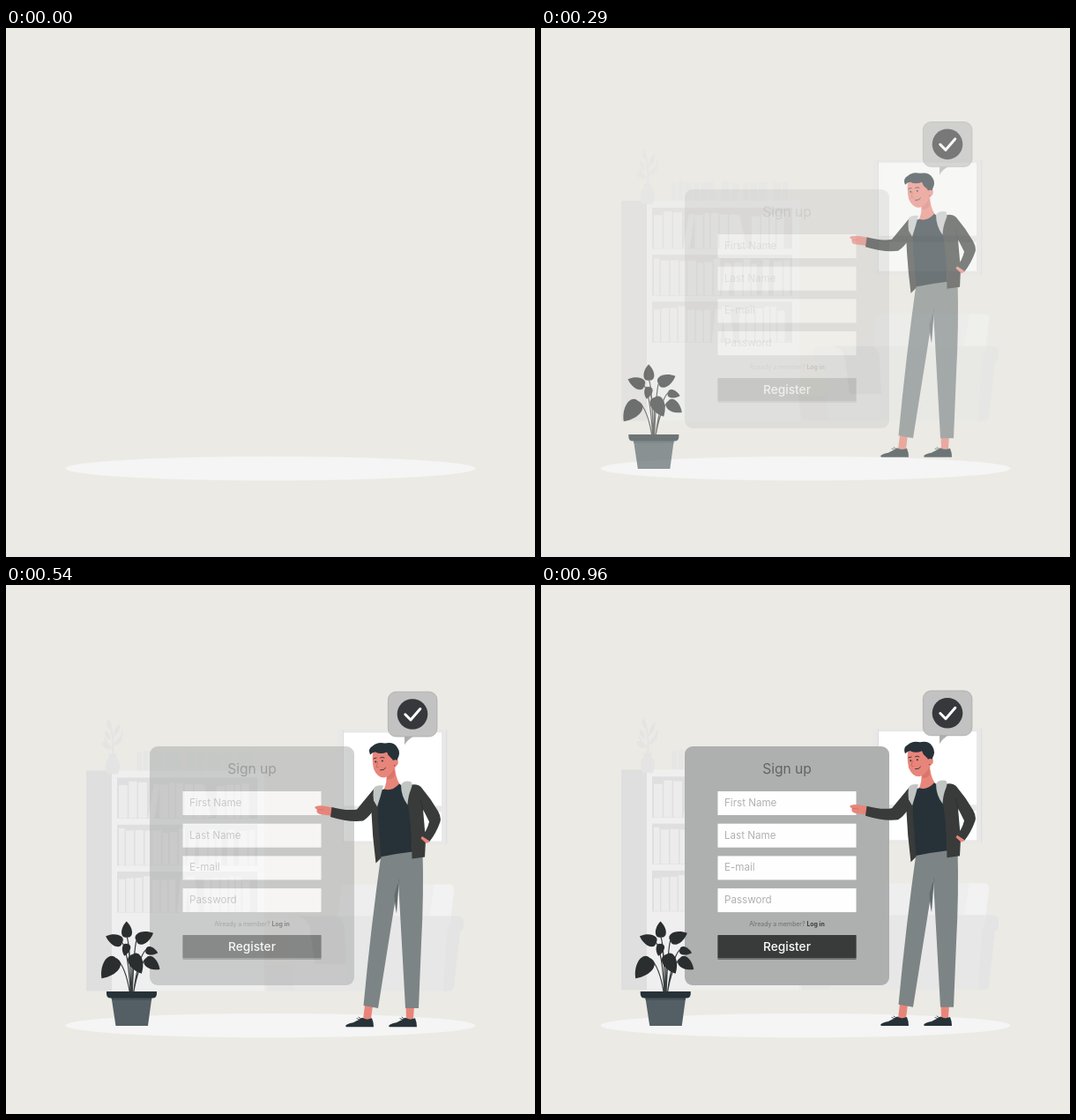
Write an HTML page that moves like this. It is 600x600 px and loops after 1 s.

```html
<!DOCTYPE html>
<html lang="en">
<head>
<meta charset="utf-8">
<title>Sign up</title>
<style>
html, body { margin: 0; width: 100%; height: 100%; overflow: hidden; background: #ebeae4; }
svg { display: block; width: 100vw; height: 100vh; }
text { font-family: Inter, Roboto, sans-serif; }
.skin { fill: #e8857a; }
.navy { fill: #263238; }
.coat { fill: #383b3a; }
.hood { fill: #c1c5c4; }
.line { fill: none; stroke-linecap: round; stroke-linejoin: round; }
</style>
</head>
<body>
<svg viewBox="0 0 600 600" xmlns="http://www.w3.org/2000/svg">
  <ellipse cx="300" cy="499.6" rx="232.5" ry="13.7" fill="#f5f5f5"/>

  <g id="room">
    <!-- bookcase -->
    <rect x="91" y="209" width="29" height="250" fill="#dfdfdf"/>
    <rect x="120" y="209" width="173" height="250" fill="#efefef"/>
    <g id="shelves"></g>
    <g fill="#e4e4e4">
      <path d="M116 190H126L125 194Q130 200 129 206L127 213H115L113 206Q112 200 117 194Z"/>
      <path class="line" d="M121 191Q123 172 118 156M121 184Q114 180 112 173M122 180Q131 175 132 165M122 170Q127 164 129 157" stroke="#e4e4e4" stroke-width="2"/>
      <g id="twigs"></g>
    </g>
    <!-- window -->
    <rect x="376.500" y="162" width="124" height="131" fill="#e8e8e8"/>
    <path d="M383 166H494V249H383ZM383 256H494V289H383Z" fill="#fff"/>
    <path d="M382.500 163V292M499.700 163V292" stroke="#dcdcdc"/>
    <!-- sofa -->
    <path d="M386 338H502Q509 338 508 345L503 395H375L380 344Q381 338 386 338Z" fill="#eeeeee"/>
    <path d="M486 338H502Q509 338 508 345L503 385H478Z" fill="#f2f2f2"/>
    <path d="M376 374H506L503 455Q502 459 498 459H325L322 425Z" fill="#e7e7e7"/>
    <path d="M506 374H513Q519 374 519 381V386Q519 391 515 392L508 455Q507 459 501 459H496L500 392Z" fill="#e4e4e4"/>
    <path d="M319 374H360V428H385V455H326L320 395Q308 391 308 382Q309 374 319 374Z" fill="#e8e8e8"/>
    <path d="M331 374H372Q382 374 384 386L386 428H350L345 389Q342 376 331 374Z" fill="#dcdcdc"/>
    <path d="M292 430H322L327 459H296Z" fill="#e5e5e5"/>
  </g>

  <g id="form">
    <rect x="163" y="183" width="232" height="271" rx="9" fill="#aeb0af"/>
    <text x="279" y="214" font-size="15.6" text-anchor="middle" fill="#606463">Sign up</text>
    <g id="fields"></g>
    <text x="279" y="387" font-size="6.9" text-anchor="middle" fill="#6b6f6e">Already a member? <tspan font-weight="700" fill="#383b3a">Log in</tspan></text>
    <rect x="200.500" y="398.600" width="157" height="26.400" fill="#6f7271"/>
    <rect x="200.500" y="397" width="157" height="26" fill="#383b3a"/>
    <text x="279" y="414.500" font-size="13.700" font-weight="500" text-anchor="middle" fill="#fff">Register</text>
  </g>

  <g id="person">
    <!-- ankles and shoes -->
    <path class="skin" d="M407 475H416L414 491H405ZM453.500 475H463L462 491H454Z"/>
    <g id="shoes"></g>
    <!-- trousers -->
    <path d="M426 300L472.500 298Q474 350 471 405L468 478.500H453L445 334L422 478.500L405.500 475.500Q414 385 426 300Z" fill="#7c8486"/>
    <path d="M446 331L440.500 350Q441 362 443 371Z" fill="#636b6d"/>
    <!-- torso -->
    <path class="skin" d="M431 211L441 202Q441 216 447 225Q438 236 428 232Q433 222 431 211Z"/>
    <path d="M432 215Q438 212 440 207L441 215Q438 219 432 219Z" fill="#d9756c"/>
    <path class="navy" d="M422 232L429 230Q438 233 446 224L458 232L461 301Q443 303 424 307L418 250Z"/>
    <!-- pointing arm -->
    <path class="skin" d="M371 251L363 249.500Q356 248 350.500 250Q349.500 252 353 253Q351 257 356 258.500L371 260.500Z"/>
    <path d="M353 253.300L360 253.500" class="line" stroke="#d16d64" stroke-width=".7"/>
    <path class="coat" d="M369.500 250.500Q386 255 398 253Q407 242 417 230L420 249Q412 262 405 266Q389 268 368 261.500Z"/>
    <!-- jacket -->
    <path class="coat" d="M415 233L426 229Q421 246 422 263L425.500 308L419.500 314Q415 280 414 245Z"/>
    <path class="coat" d="M457 226Q466 223 471 228Q482 241 490 255Q494 262 492.500 267Q488 280 480 290L471 285Q478 276 480 267L473 253L476 288L475 307L460.500 309Q460 262 453 233Z"/>
    <path class="line" d="M473 254Q472 247 470 242" stroke="#2a2d2c" stroke-width=".8"/>
    <path class="skin" d="M472 283.500L480.500 289Q477 293 475 290L470.500 286Z"/>
    <path class="hood" d="M417 229Q420 225 428 226Q425 238 421 250L417 243Q416 236 417 229Z"/>
    <path class="hood" d="M448 225Q451 220 459 221.500Q462 224 459 231Q456 238 455.500 248Q448 238 448 225Z"/>
    <!-- head -->
    <path class="skin" d="M416 189Q415 197 417 207Q421 217 429 217Q436 216 440 206Q446 203 444 195Q441 185 430 184Z"/>
    <path class="navy" d="M413 191Q410 184 416 181Q421 176 430 178Q440 176 444 183Q448 189 444 196Q443 203 440 204Q440 197 437 195Q433 192 432 188Q425 191 419 188Q416 188 413 191Z"/>
    <circle class="skin" cx="441.500" cy="200" r="3.200"/>
    <circle class="navy" cx="419.300" cy="199" r="1"/>
    <circle class="navy" cx="426.800" cy="198" r="1"/>
    <path class="line" d="M417 195.500L420 194.700M424.500 194.500Q427 193 429 194.500M424.500 208.500Q429 209 430.500 206" stroke="#263238" stroke-width=".9"/>
    <path class="line" d="M421.500 199L420 205L422.500 205.300" stroke="#cf675f" stroke-width=".9"/>
    <!-- speech bubble -->
    <path d="M452 169V180Q455 174 464 169Z" fill="#aeaeae"/>
    <rect x="433.400" y="119.700" width="55.500" height="50.800" rx="9" fill="#c2c2c2" stroke="#aaaaaa" stroke-width=".8"/>
    <circle cx="461" cy="145" r="17.300" fill="#37383b"/>
    <path class="line" d="M452.800 145.300L459 151.500L469.800 139" stroke="#fff" stroke-width="3"/>
  </g>

  <g id="plant">
    <g id="leaves"></g>
    <path d="M118 467H164L159.500 500H123Z" fill="#535f64"/>
    <path d="M118 467H164L163.500 471H118.500Z" fill="#465257"/>
    <path class="navy" d="M112.500 461H169.500V464Q169 468.500 165 468.500H117Q113 468.500 112.500 464Z"/>
  </g>
</svg>
<script>
const el = id => document.getElementById(id);
const repeat = (n, make) => Array.from({ length: n }, (_, i) => make(i)).join('');
const FPS = 24, LOOP = 1000, DROP = 36;

let seed = 11;
const random = (lo, hi) => {
  seed = seed * 16807 % 2147483647;
  return lo + (hi - lo) * seed / 2147483647;
};

// A row of books standing on a shelf; some lean
function books(left, right, base, height, fill) {
  let out = '';
  for (let x = left; x < right;) {
    const w = random(6, 10), h = height * random(.85, 1);
    const leans = random(0, 1) < .35 && x > left + 30 && x < right - 20;
    const lean = leans ? random(-13, 10) : 0;
    out += `<rect x="${x}" y="${base - h}" width="${w}" height="${h}" fill="${fill}" transform="rotate(${lean} ${x} ${base})"/>`;
    x += w + (leans ? 6 : 1.5);
  }
  return out;
}
el('shelves').innerHTML = books(148, 274, 209, 23, '#e6e6e6') + repeat(3, i => {
  const top = 217 + i * 53.3;
  return `<rect x="126" y="${top}" width="159" height="46.500" fill="#dfdfdf"/>` + books(128, 276, top + 46, 42, '#ececec');
});

// Twig tips alternate left and right around the vase stem
el('twigs').innerHTML = repeat(5, i => {
  const side = i % 2 ? 1 : -1, y = 181 - i * 6;
  return `<ellipse cx="${121 + side * (8 - i)}" cy="${y}" rx="2.400" ry="5.500" transform="rotate(${side * (45 - i * 8)} ${121 + side * (8 - i)} ${y})"/>`;
});

const labels = ['First Name', 'Last Name', 'E-mail', 'Password'];
el('fields').innerHTML = repeat(labels.length, i => {
  const y = 234 + i * 36.7;
  return `<rect x="200.500" y="${y}" width="157" height="27" fill="#fff"/>
    <text x="208" y="${y + 17}" font-size="11.600" fill="#b0b0b0">${labels[i]}</text>`;
});

el('shoes').innerHTML = repeat(2, i => `<g transform="translate(${i * 49} .3)">
  <path class="navy" d="M385 498.500Q386 496 394 494.500Q401 491 404 489Q409 492 415 489.500Q417 494 417 499.500H386Z"/>
  <path class="line" d="M398 490L403 492M400 488.500L404 491" stroke="#263238" stroke-width=".8"/></g>`);

// Leaves point away from the crown: centre x, centre y, length
const crown = { x: 136, y: 408 };
const leaves = [
  [135.500, 390.500, 18], [121, 402, 20], [156, 399, 21], [134.500, 414, 14],
  [164, 415.500, 14], [115.500, 435, 28], [147, 430, 24], [165, 430, 20]
].map(([x, y, len]) => ({ x, y, len, angle: Math.atan2(y - crown.y, x - crown.x) }));

function leaf({ x, y, len, angle }) {
  const r = len / 2, w = len * .42;
  return `<path transform="translate(${x} ${y}) rotate(${angle * 180 / Math.PI})"
    d="M${-r} 0C${-r * 1.2} ${w} ${r * .1} ${w * 1.1} ${r} 0C${r * .1} ${-w * 1.1} ${-r * 1.2} ${-w} ${-r} 0Z"/>`;
}
function stem({ x, y, len, angle }) {
  const bx = x - len / 2 * Math.cos(angle), by = y - len / 2 * Math.sin(angle);
  const foot = 141 + (bx - 140) * .12;
  return `M${foot} 463Q${foot + (bx - 140) * .3} ${by + 9} ${bx} ${by}`;
}
el('leaves').innerHTML =
  `<path class="line" d="${leaves.map(stem).join('')}" stroke="#383c3c" stroke-width="1.200"/>
   <g fill="#2b2e2e">${leaves.map(leaf).join('')}</g>`;

// Damped swing: runs past 1 a little, then settles
const slide = t => 1 - Math.cos(3.27 * t) * Math.exp(-5.4 * t * t);
const easeInOut = t => t * t * (3 - 2 * t);

function place(id, x, y, opacity) {
  el(id).setAttribute('transform', `translate(${x} ${y})`);
  el(id).setAttribute('opacity', opacity);
}

function draw(ms) {
  const step = Math.floor((ms % LOOP + 5) * FPS / 1000) % FPS;
  const t = step / FPS, shown = step > 1;
  const p = slide(t), shift = (p - 1) * DROP;
  const fade = shown ? Math.min(1, p) : 0;
  place('room', 0, shift, fade);
  place('person', 0, shift, fade);
  place('plant', shift, 0, fade);
  place('form', 0, 0, shown ? easeInOut(t) : 0);
}

const start = performance.now();
function tick() {
  draw(performance.now() - start);
  requestAnimationFrame(tick);
}
tick();
</script>
</body>
</html>
```
